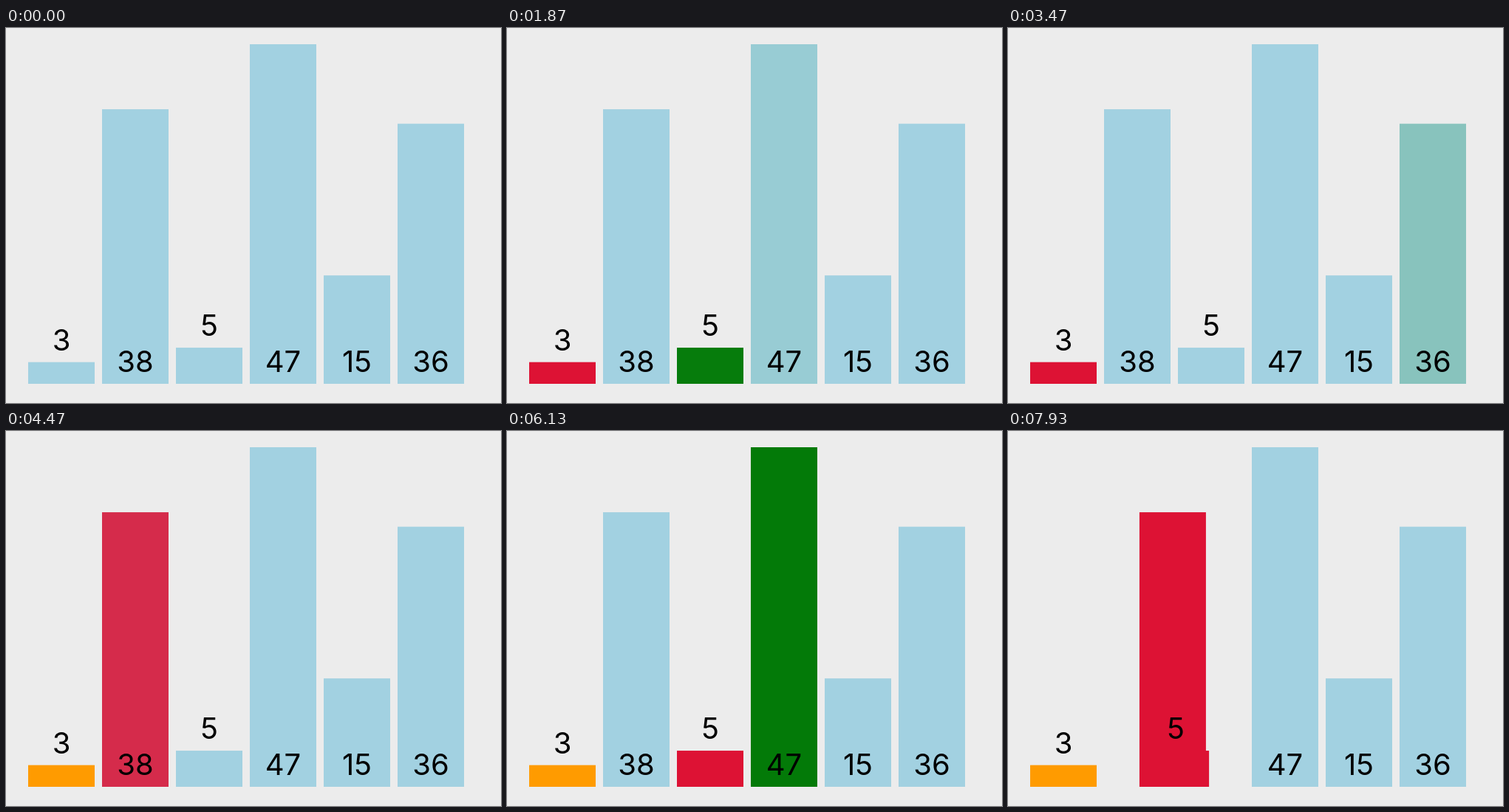
Recreate the animation shown at these times as an HTML page. Size 670x508 px, loop 8000 ms.

```html
<!DOCTYPE html>
<html lang="en">
<head>
<meta charset="utf-8">
<title>Selection sort</title>
<style>
  html, body { margin: 0; width: 100%; height: 100%; overflow: hidden; background: #ececec; }
  svg { display: block; width: 100%; height: 100%; }
  text { font: 400 40px Inter, Roboto, sans-serif; text-anchor: middle; fill: #000; }
</style>
</head>
<body>
<svg id="stage" viewBox="0 0 670 508"></svg>
<script>
const LOOP = 8000, START = 356, TICK = 500, FADE = 200, SWAP = 265;
const BASE = 482, UNIT = 460 / 47, PITCH = 100;
const BLUE = [162, 209, 225], RED = [221, 18, 52], GREEN = [3, 122, 8], ORANGE = [255, 155, 0];
const values = [3, 38, 5, 47, 15, 36];

// [tick, bar, colour]
const steps = [
  [0, 0, RED],
  [1, 1, GREEN],
  [2, 1, BLUE], [2, 2, GREEN],
  [3, 2, BLUE], [3, 3, GREEN],
  [4, 3, BLUE], [4, 4, GREEN],
  [5, 4, BLUE], [5, 5, GREEN],
  [6, 5, BLUE],
  [7, 0, ORANGE],
  [8, 1, RED],
  [9, 2, GREEN],
  [10, 1, BLUE], [10, 2, RED],
  [11, 3, GREEN],
  [12, 3, BLUE], [12, 4, GREEN],
  [13, 4, BLUE], [13, 5, GREEN],
  [14, 5, BLUE], [14, 1, RED]
];
const swap = { tick: 15, left: 1, right: 2 };

const at = tick => START + tick * TICK;
const clamp = x => Math.min(1, Math.max(0, x));
const mix = (a, b, p) => a.map((v, i) => v + (b[i] - v) * p);

// cubic-bezier(.25, .1, .25, 1)
function ease(x) {
  if (x <= 0 || x >= 1) return clamp(x);
  const curve = (u, a, b) => 3 * a * u * (1 - u) ** 2 + 3 * b * u * u * (1 - u) + u ** 3;
  let lo = 0, hi = 1;
  for (let i = 0; i < 20; i++) {
    const mid = (lo + hi) / 2;
    if (curve(mid, .25, .25) < x) lo = mid; else hi = mid;
  }
  return curve(lo, .1, 1);
}

function add(parent, name, attrs) {
  const el = document.createElementNS("http://www.w3.org/2000/svg", name);
  for (const key in attrs) el.setAttribute(key, attrs[key]);
  return parent.appendChild(el);
}

const stage = document.getElementById("stage");
const bars = values.map(value => {
  const height = value * UNIT, top = BASE - height;
  const group = add(stage, "g", {});
  const rect = add(group, "rect", { y: top, width: 90, height });
  const label = add(group, "text", { x: 45, y: (height < 45 || value === 5 ? top : BASE) - 16 });
  label.textContent = value;
  return { group, rect };
});

function colorAt(bar, t) {
  let color = BLUE;
  for (const [tick, index, next] of steps) {
    if (index !== bar) continue;
    const lag = next === BLUE ? 8 : 0;
    color = mix(color, next, ease((t - at(tick) - lag) / FADE));
  }
  return color;
}

function draw(t) {
  const shift = PITCH * ease((t - at(swap.tick)) / SWAP);
  bars.forEach(({ group, rect }, i) => {
    const dx = i === swap.left ? shift : i === swap.right ? -shift : 0;
    group.setAttribute("transform", `translate(${30 + i * PITCH + dx} 0)`);
    rect.setAttribute("fill", `rgb(${colorAt(i, t).map(Math.round)})`);
  });
}

const begin = performance.now();
function tick() {
  draw((performance.now() - begin) % LOOP);
  requestAnimationFrame(tick);
}
tick();
</script>
</body>
</html>
```
